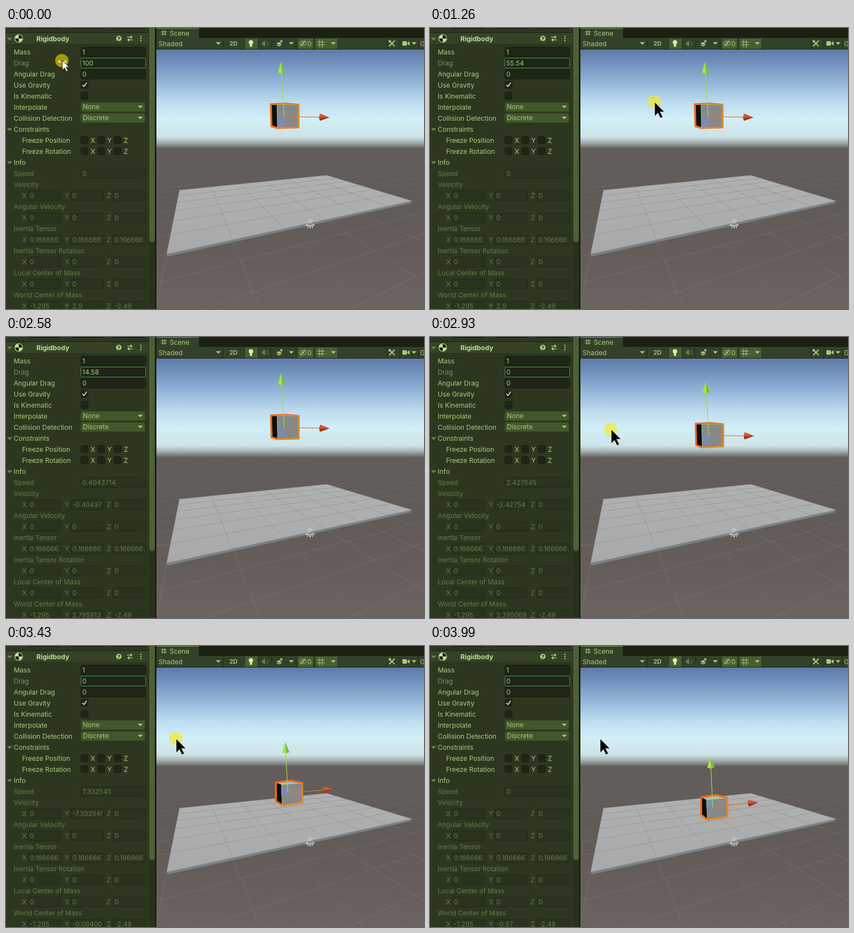
An HTML page with a canvas for the animation above (4190 ms loop, 756x509 px).

```html
<!DOCTYPE html>
<html lang="en">
<head>
<meta charset="utf-8">
<title>Drag and fall</title>
<style>
  html, body { margin: 0; width: 100%; height: 100%; overflow: hidden; background: #2d3720; }
  canvas { display: block; width: 756px; height: 509px; }
</style>
</head>
<body>
<canvas id="stage" width="756" height="509"></canvas>
<script>
const ctx = document.getElementById('stage').getContext('2d');
const LOOP = 4190, STEP = 70, LAST_STEP = 57, TOP = 2.9, FLOOR = -0.87;
const INK = '#a9cd7b', DIM = '#657d45', PANEL = '#2d3720', FIELD = '#1e2516', EDGE = '#171c10',
  BAR = '#34412a', ACTIVE = '#485d31', DARK = '#1b2112';

// Motion -------------------------------------------------------------

const mix = (a, b, k) => a + (b - a) * k;
const easeOut = (k, power) => 1 - (1 - Math.min(1, k)) ** power;

// The drag value is scrubbed down to zero in a few strokes.
const DRAG_KEYS = [[0, 100], [1260, 55.54], [1960, 44.99], [2590, 14.58], [2840, 0], [LOOP, 0]];

function dragAt(t) {
  const i = DRAG_KEYS.findIndex(key => key[0] > t);
  const [t0, d0] = DRAG_KEYS[i - 1], [t1, d1] = DRAG_KEYS[i];
  return mix(d0, d1, (t - t0) / (t1 - t0));
}

// Free fall with linear drag in fixed 20 ms physics steps.
function bodyAt(t) {
  const dt = 0.02;
  let speed = 0, height = TOP;
  for (let time = 30; time <= t; time += 1000 * dt) {
    speed = (speed + 9.81 * dt) * Math.max(0, 1 - dragAt(time) * dt);
    height -= speed * dt;
    if (height <= FLOOR) return { speed: 0, height: FLOOR };
  }
  return { speed, height };
}

// Three strokes to the left; the pointer wraps round the screen between them.
function pointerAt(t) {
  if (t < 1100) return { x: 101 - 84 * easeOut(t / 550, 1.5), y: 58 + 8 * (t / 1100) ** 2, small: true };
  if (t < 1180) return null;
  if (t < 2260) return { x: 93 - .35 * (t - 1960) + 213 * Math.exp((1190 - t) / 61), y: 134 - (t - 1190) / 500 };
  if (t < 2650) return null;
  const k = easeOut((t - 2660) / 600, 4.6);
  return { x: mix(668, 307, k), y: mix(160, 167.5, k) };
}

// Drawing helpers ----------------------------------------------------

function box(x, y, w, h, fill, line, r = 0) {
  const inset = line ? .5 : 0;
  ctx.beginPath();
  ctx.roundRect(x + inset, y + inset, w - 2 * inset, h - 2 * inset, r);
  ctx.fillStyle = fill;
  ctx.fill();
  if (line) { ctx.strokeStyle = line; ctx.lineWidth = 1; ctx.stroke(); }
}

function poly(points, fill, line, width = 1, open) {
  ctx.beginPath();
  points.forEach(p => ctx.lineTo(p[0], p[1]));
  if (!open) ctx.closePath();
  if (fill) { ctx.fillStyle = fill; ctx.fill(); }
  if (line) { ctx.strokeStyle = line; ctx.lineWidth = width; ctx.lineJoin = 'round'; ctx.stroke(); }
}
const stroke = (points, color, width = 1) => poly(points, null, color, width, true);

function oval(x, y, rx, ry, fill, line, width = 1) {
  ctx.beginPath();
  ctx.ellipse(x, y, rx, ry, 0, 0, 2 * Math.PI);
  if (fill) { ctx.fillStyle = fill; ctx.fill(); }
  if (line) { ctx.strokeStyle = line; ctx.lineWidth = width; ctx.stroke(); }
}
const disc = (x, y, r, fill, line, width) => oval(x, y, r, r, fill, line, width);

function text(str, x, mid, color = INK, weight = 400, size = 12) {
  ctx.font = `${weight} ${size}px Inter, sans-serif`;
  ctx.fillStyle = color;
  ctx.fillText(str, x, Math.round(mid + 4));
}

function fade(y0, y1, colors) {
  const g = ctx.createLinearGradient(0, y0, 0, y1);
  colors.forEach((c, i) => g.addColorStop(i / (colors.length - 1), c));
  return g;
}

function clipped(x, y, w, h, paint) {
  ctx.save();
  ctx.beginPath();
  ctx.rect(x, y, w, h);
  ctx.clip();
  paint();
  ctx.restore();
}

const pointDown = (x, y, r, color) => poly([[x - r, y - r / 2], [x + r, y - r / 2], [x, y + r / 2]], color);
const caret = (x, y) => pointDown(x, y, 4.5, INK);

// Inspector ----------------------------------------------------------

function field(value, x, y, w, { off, focus } = {}) {
  box(x, y - 10, w, 19, off ? '#2a331e' : FIELD, focus ? '#43915f' : off ? '#222a17' : EDGE, 3);
  clipped(x, y - 10, w - 3, 19, () => text(value, x + 3, y, off ? DIM : INK));
}

function vector(name, y, values) {
  text(name, 14, y, DIM);
  values.forEach((value, i) => {
    const x = 40 + Math.round(i * 76.5);
    text('XYZ'[i], x - 11, y + 20, DIM);
    field(value, x, y + 20, 60, { off: true });
  });
}

function checkbox(x, y, on) {
  box(x, y - 7, 14, 14, FIELD, EDGE, 3);
  if (on) stroke([[x + 3, y], [x + 6, y + 3], [x + 11, y - 4]], '#d5edb4', 1.7);
}

function dropdown(value, y) {
  box(135, y - 10, 117, 18, '#42572c', '#34441f', 3);
  text(value, 139, y - 1);
  caret(243, y - 1);
}

function header() {
  box(0, 8, 258, 1, DARK);
  box(0, 9, 258, 20, '#364226');
  box(0, 29, 258, 1, '#28311c');
  disc(23, 19, 7, '#11150c', '#cbe6a8', 1.2);
  for (const a of [0, Math.PI]) {
    ctx.beginPath();
    ctx.moveTo(23, 19);
    ctx.arc(23, 19, 6.5, a, a + Math.PI / 2);
    ctx.fillStyle = '#bfe58b';
    ctx.fill();
  }
  text('Rigidbody', 55, 20, '#bbdc91', 700);
  disc(204, 19, 5, INK);
  text('?', 201.5, 19, PANEL, 800, 9);
  for (const side of [-1, 1]) {
    const y = 19 + side * 2.5;
    stroke([[219, y], [229, y]], INK, 1.3);
    box(223 - side * 2, y - 2.5, 2, 5, INK);
  }
  for (const dy of [-4, 0, 4]) disc(244, 19 + dy, 1.2, INK);
}

function inspector(drag, { speed, height }) {
  const num = v => String(Number(v.toPrecision(7)));
  const zeros = ['0', '0', '0'];
  box(0, 0, 272, 509, PANEL);
  for (let i = 0; i < 3; i++) box(40 + i * 76.5, 0, 60, 2, FIELD);
  box(258, 0, 12, 509, '#28311c');
  box(259, -6, 10, 394, '#4d6035', null, 5);
  box(270, 0, 2, 509, '#14180d');
  header();
  for (const y of [20, 184, 244]) pointDown(6.5, y, 5, '#6a8548');

  ['Mass', 'Drag', 'Angular Drag', 'Use Gravity', 'Is Kinematic', 'Interpolate', 'Collision Detection', 'Constraints']
    .forEach((name, i) => text(name, 14, 44 + i * 20, name === 'Drag' ? '#709461' : INK));
  field('1', 135, 44, 118);
  field(num(Number(drag.toFixed(2))), 135, 64, 118, { focus: true });
  field('0', 135, 84, 118);
  checkbox(135, 103, true);
  checkbox(135, 123);
  dropdown('None', 144);
  dropdown('Discrete', 164);
  ['Freeze Position', 'Freeze Rotation'].forEach((name, row) => {
    const y = 204 + row * 20;
    text(name, 29, y);
    [...'XYZ'].forEach((axis, i) => {
      checkbox(135 + i * 30, y - 1);
      text(axis, 153 + i * 30, y);
    });
  });
  text('Info', 14, 244);
  text('Speed', 14, 264, DIM);
  field(num(speed), 135, 264, 118, { off: true });

  Object.entries({
    'Velocity': ['0', speed ? num(-speed) : '0', '0'],
    'Angular Velocity': zeros,
    'Inertia Tensor': Array(3).fill('0.1666667'),
    'Inertia Tensor Rotation': zeros,
    'Local Center of Mass': zeros,
    'World Center of Mass': ['-1.295', num(height), '-2.49']
  }).forEach(([name, values], i) => vector(name, 284 + i * 40, values));
}

// Scene --------------------------------------------------------------

// Perspective map from the unit square to the slab's top face.
function ground(u, v) {
  const w = 0.388 * u - 0.5326 * v + 1;
  return w > 0.04 && [(491 * u - 178 * v + 314) / w, (76.7 * u - 102.8 * v + 294) / w];
}

function grid(from, to, color) {
  const line = at => {
    const points = [];
    for (let k = from; k <= to + .01; k += .1) points.push(ground(...at(k)));
    stroke(points.filter(Boolean), color);
  };
  for (let i = from * 6; i <= to * 6; i++) {
    line(k => [i / 6, k]);
    line(k => [k, i / 6]);
  }
}

function backdrop() {
  box(272, 39, 484, 159, fade(39, 198, ['#5d7aa8', '#7799c3', '#98b9da', '#bddcef', '#d2eff7', '#cde2e7']));
  box(272, 197, 484, 21, fade(197, 218, ['#cfe3e8', '#a3aeb0', '#666260']));
  box(272, 218, 484, 291, fade(218, 509, ['#625d5a', '#615b58', '#645d5a', '#6b6360']));
  clipped(272, 218, 484, 291, () =>
    grid(-2, 3, fade(218, 380, ['rgba(150,150,150,0)', 'rgba(150,150,150,.12)', 'rgba(165,165,165,.22)'])));

  const [back, right, front, left] = [ground(0, 0), ground(1, 0), ground(1, 1), ground(0, 1)];
  poly([left, front, [front[0], front[1] + 4], [left[0] + 1, left[1] + 5]], '#7b8081');
  poly([back, right, front, left], fade(267, 410, ['#b1b1b1', '#a9a9a9']), '#bdbdbd', .8);
  grid(0, 1, 'rgba(125,128,130,.45)');

  disc(550, 350, 4.5, 'rgba(235,240,235,.25)');
  for (let i = 1; i < 6; i++) {
    const c = Math.cos(Math.PI * i / 6), s = Math.sin(Math.PI * i / 6);
    stroke([[550 + 5 * c, 353 + 4 * s], [550 + 9 * c, 354 + 9 * s]], '#f1f5ea', 1.5);
  }
}

// An axis handle: shaft, cone and its shaded half.
function handle(fromX, fromY, tipX, tipY, length, colors) {
  const angle = Math.atan2(tipY - fromY, tipX - fromX);
  const reach = Math.hypot(tipX - fromX, tipY - fromY);
  const at = (along, across) => [
    fromX + along * Math.cos(angle) - across * Math.sin(angle),
    fromY + along * Math.sin(angle) + across * Math.cos(angle)];
  const base = reach - length;
  stroke([at(0, 0), at(base, 0)], colors[0], 1.2);
  poly([at(reach, 0), at(base, -6.5), at(base - 2, 0), at(base, 6.5)], colors[1]);
  poly([at(reach, 0), at(base - 2, 1), at(base, 6.5)], colors[2]);
}

function cube(height) {
  const h = TOP - height, k = h / (TOP - FLOOR);
  const dx = 3.3 * h, dy = 37.6 * h - .55 * h * h;
  const at = (x, y, px, py) => [x + dx + px * k, y + dy + py * k];
  const topLeft = at(490, 138, -2, 7), topRight = at(529, 139, -4, 2);
  const lowRight = at(529, 180, -4, -5), lowLeft = at(491, 181, -2, 0);
  const backTop = at(479, 138, -1, 2), backLow = at(480, 178, -2, -6), backRight = at(505, 137, 0, -1);
  const outline = [backTop, backRight, topRight, lowRight, lowLeft, backLow];
  const front = [topLeft, topRight, lowRight, lowLeft];
  const cx = 503 + dx - 4 * k, cy = 160 + dy - 2 * k;

  poly(outline, '#b3b8b5');
  poly([backTop, topLeft, lowLeft, backLow], '#0c0f0e');
  poly(front, '#85898a');
  box(cx - 12, cy - 13 * k, 14, 20 - 7 * k, 'rgba(122,140,190,.7)');
  poly(outline, null, '#f26a1b', 3.4);
  poly(front, null, 'rgba(150,225,100,.7)');

  handle(cx, cy, 497 + dx - 2.4 * k, cy - mix(99, 90, k), 20 - 2 * k, ['#98dd4b', '#a0e54c', '#7dbb38']);
  handle(cx, cy, 585 + dx - 4 * k, cy + 2 - 2.9 * h, 17, ['#e47537', '#d6552b', '#963a20']);
}

function toolbar() {
  box(272, 0, 484, 18, DARK);
  box(272, 0, 77, 19, BAR);
  box(272, 0, 77, 1, '#799b50');
  box(272, 18, 484, 21, BAR);
  box(272, 38, 484, 1, DARK);
  for (const [x, w] of [[432, 23], [528, 28], [560, 40]]) box(x, 19, w, 19, ACTIVE);
  for (const x of [392, 431, 456, 480, 524, 556, 600, 688, 712, 745]) box(x, 19, 1, 19, '#222b18');

  const hash = (x, y, gap, r) => {
    for (const d of [-gap, gap]) {
      stroke([[x + d, y - r], [x + d, y + r]], INK);
      stroke([[x - r, y + d], [x + r, y + d]], INK);
    }
  };
  hash(285.5, 9, 2, 5);
  hash(569.5, 28, 2.5, 7);
  text('Scene', 296, 10);
  text('Shaded', 276, 29);
  text('2D', 404, 28, INK, 600, 11);
  text('0', 545, 29);
  text('G', 749, 29);
  for (const x of [384, 516, 592, 738]) caret(x, 28);

  disc(443, 26, 4, '#d3f0a6');
  box(441, 29, 4, 5, '#d3f0a6');
  poly([[463, 26], [469, 23], [469, 33], [463, 30]], DIM);
  stroke([[473, 24], [474, 28], [473, 32]], DIM);
  for (const y of [31, 28]) poly([[488, y], [494, y - 3], [500, y], [494, y + 3]], INK, BAR);
  disc(498, 24, 2, INK);
  oval(537, 28, 6, 4, null, INK);
  disc(537, 28, 1.7, INK);
  stroke([[532, 33], [542, 23]], INK, 1.3);
  stroke([[693, 33], [703, 23]], INK, 2.2);
  stroke([[694, 24], [703, 33]], INK, 1.8);
  disc(694, 24, 2.2, INK);
  box(717, 24, 8, 8, INK, null, 1);
  poly([[725, 28], [730, 24], [730, 32]], INK);
}

function pointer(t) {
  const p = pointerAt(t);
  if (!p) return;
  const { x, y, small } = p, size = small ? .66 : .94;
  if (t < 3640) disc(x, y + (small ? 1 : 0), 12, 'rgba(255,232,0,.56)');
  if (small) for (const side of [-1, 1]) {
    const px = x + 1 + side * 4;
    poly([[px + side * 4, y + 3], [px, y], [px, y + 6]], '#f4f4dc');
  }
  const arrow = [[0, 0], [0, 26], [6, 20], [11, 30], [15, 28], [10, 18], [18, 18]];
  poly(arrow.map(([ax, ay]) => [x + 1 + ax * size, y + 1 + ay * size]),
    small ? '#fff' : '#000', small ? '#222' : 'rgba(235,240,225,.45)', .8);
}

function draw(t) {
  const body = bodyAt(t);
  backdrop();
  cube(body.height);
  toolbar();
  inspector(dragAt(t), body);
  pointer(t);
}

let shown = -1;
function tick() {
  const step = Math.min(LAST_STEP, Math.floor((performance.now() % LOOP + 10) / STEP));
  if (step !== shown) draw((shown = step) * STEP);
  requestAnimationFrame(tick);
}
tick();
</script>
</body>
</html>
```
